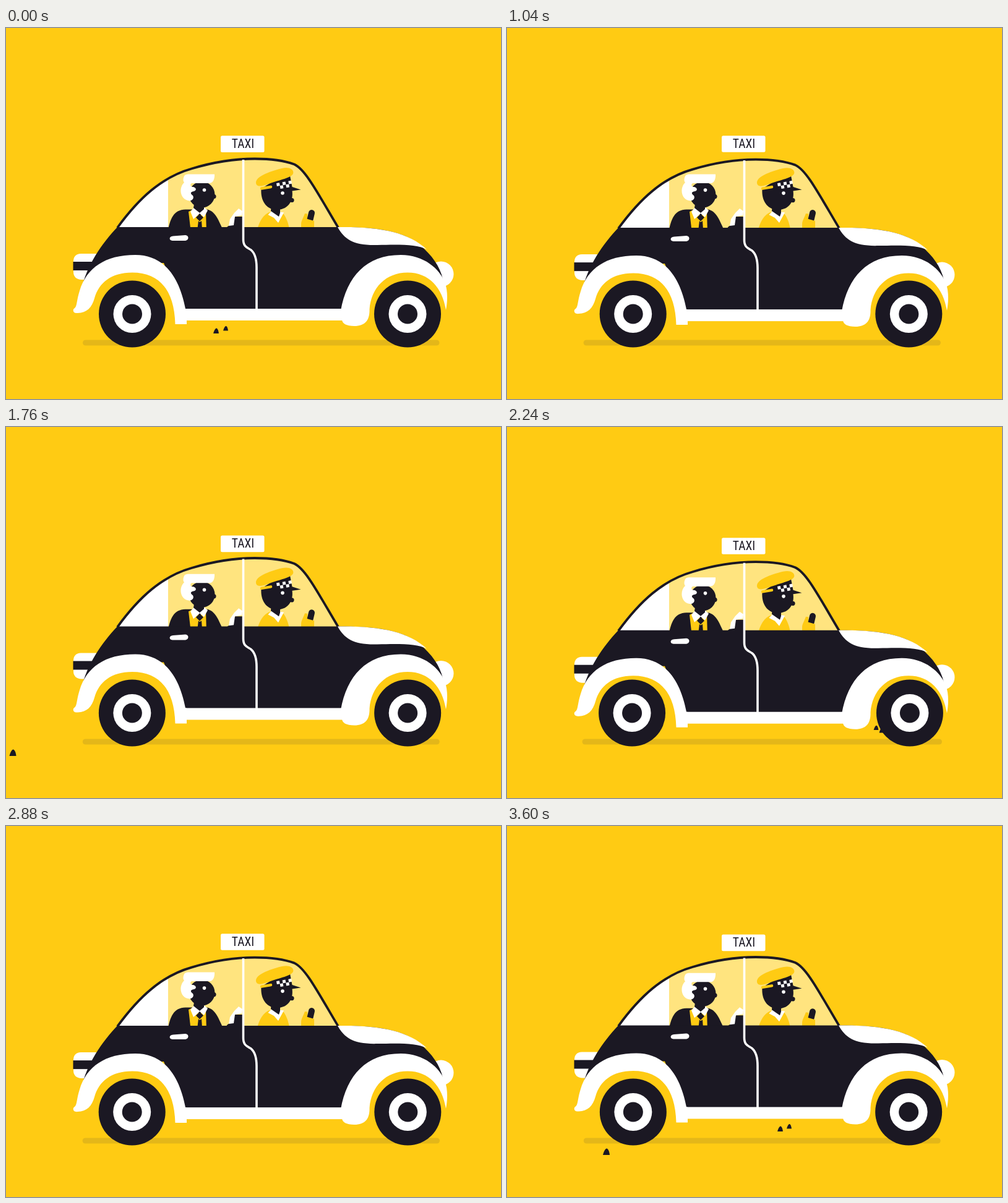
Animation of 800x600 px, one loop 3680 ms. Source, as an HTML page:

```html
<!DOCTYPE html>
<html lang="en">
<head>
<meta charset="utf-8">
<title>Taxi ride</title>
<style>
  html, body { margin: 0; width: 100%; height: 100%; overflow: hidden; background: #ffcb13; }
  svg { display: block; width: 800px; height: 600px; }
  .dark { fill: #1b1823; }
  .white { fill: #fff; }
  .yellow { fill: #ffcb13; }
  .sign { font: 400 19.5px "Roboto Condensed", Roboto, sans-serif; font-stretch: condensed; }
</style>
</head>
<body>
<svg viewBox="0 0 800 600">
  <defs>
    <path id="glass" d="M180 323C215 275 252 241 300 227.500C338 216 375 211.500 402 211.500C425 211.500 450 214.500 466 220.500C484 229 502 264 537 323"/>
    <clipPath id="rear"><rect x="170" y="200" width="92" height="130"/></clipPath>
    <path id="stone" d="M-5.5 5C-4 -1-1.5 -5.5 .8 -5.5C3.2 -5 5 0 5.5 5Z"/>
    <g id="wheel">
      <circle r="54" class="dark"/>
      <circle r="30.5" class="white"/>
      <circle r="16" class="dark"/>
    </g>
  </defs>

  <rect width="800" height="600" class="yellow"/>
  <line id="shadow" y1="509" y2="509" stroke="#e4b719" stroke-width="9" stroke-linecap="round"/>
  <g id="far" class="dark"></g>

  <g id="sign">
    <rect x="347" y="174.2" width="70.5" height="26.6" rx="2.5" class="white"/>
    <text x="383" y="194" text-anchor="middle" class="dark sign">TAXI</text>
  </g>

  <g id="panes">
    <use href="#glass" fill="#ffe47f"/>
    <use href="#glass" fill="#fff" clip-path="url(#rear)"/>
  </g>

  <g id="people">
    <!-- passenger -->
    <path class="dark" d="M261 332C265 308 271 294 290 293.500H325C338 296 343 309 353 332Z"/>
    <path class="yellow" d="M295 297L301 294L313 303L323 296L324 332H299Z"/>
    <path class="white" d="M298 297L304 290L320 290L326 295L320 306L313 300L303 309Z"/>
    <path class="dark" d="M313 300.500L319 306.500L313 312.500L307 306.500ZM311 312L313 314L316 312L317.500 332H308.500Z"/>
    <path class="dark" d="M305 278H320V293L313 299L303 291Z"/>
    <circle class="dark" cx="316.500" cy="269.500" r="21"/>
    <circle class="dark" cx="336" cy="272.500" r="3.600"/>
    <path class="white" d="M289 238C292 236 296 236.500 300 236.500H337C337.500 244 335 251 328 251H300C297 253 298 256 301 257C307 257 309 262 304 264C297 265 298 268 302 271C305 276 299 281 294 279C281 276 279 258 288 250C285 246 287 241 289 238Z"/>
    <circle class="white" cx="320.500" cy="262" r="2.800"/>
    <path class="dark" d="M354 332L357 322L361 319L366 305H382V332Z"/>
    <path class="white" d="M369 299L376 292L382 296L381 303L370 305L368 319L360 320L362 309Z"/>
    <!-- driver -->
    <path class="yellow" d="M405 332C408 311 419 298 430 297H445C452 303 457 315 459 332Z"/>
    <path class="white" d="M423.500 302L431 294L449 298.500L440 315L433 307Z"/>
    <path class="dark" d="M429 280H443V299L441 305L428 296Z"/>
    <path class="dark" d="M412.500 260L428 250L459 239L462.500 257L476.500 261.500L462.500 263.500C465 282 454 294 438 294C422 294 411 281 412.500 260Z"/>
    <circle class="dark" cx="462" cy="278.500" r="3.600"/>
    <circle class="white" cx="447" cy="267" r="2.800"/>
    <path class="yellow" d="M404 251C403 241 422 233 446 227C458 224 466 229 464 235.500C462 242 441 246 426 251.500C412 257 405 257 404 251Z"/>
    <path d="M413 259.500L428 257" stroke="#ffcb13" stroke-width="4.500" stroke-linecap="round"/>
    <g id="checks" class="white" transform="translate(437 251) rotate(-10)"></g>
    <path class="yellow" d="M477 332V317C477 312 481 306 483 300L487 300.500L487 309L498 313V332Z"/>
    <path d="M491.500 309.500L494 299" stroke="#1b1823" stroke-width="10" stroke-linecap="round"/>
    <path class="yellow" d="M484 332V308L498 312V332Z"/>
  </g>

  <g id="body">
    <use href="#glass" fill="none" stroke="#1b1823" stroke-width="3.800"/>
    <path class="white" d="M146 365H121C113 365 109 370 109 377V395C109 402 114 407 122 407H140Z"/>
    <rect class="dark" x="108.500" y="378" width="40" height="14"/>
    <circle class="white" cx="703" cy="398" r="20.500"/>
    <path class="dark" d="M180 322C155 348 130 385 122.500 421L160 380H255L285 456H545L640 390L706 406C701 385 689 368 668 350C640 328 600 322 537 322Z"/>
    <path class="white" d="M536 322C604 321 650 330 680 358C664 350 638 350 600 351C562 352 547 342 536 322Z"/>
    <path fill="none" stroke="#fff" stroke-width="3.600" d="M383.500 213V342C383.500 354 390 355 396 359C403 365 405 374 405 387V456"/>
    <path class="white" d="M270 336.500L290 335C296 335.500 296 343 290 344H269C263 343.500 263 337 270 336.500Z"/>
    <rect class="white" x="285" y="454" width="262" height="19"/>
    <!-- wheel wells -->
    <path class="yellow" d="M146 475C146 420 168 394 205 394C245 394 270 420 274 475Z"/>
    <path class="yellow" d="M584 475C586 420 612 394 650 394C688 394 708 425 711 455V475Z"/>
    <!-- fenders -->
    <path class="white" d="M116 461C108 462 107 455 111 453C115 450 114 440 119 425C130 388 160 367 209 367C255 367 280 402 290 454H292V479H273.500C272 424 248 395.500 204 395.500C170 395.500 150 412 143 437C139 452 130 461 116 461Z"/>
    <path class="white" d="M541 457C551 402 582 367 638 367C676 367 701 390 709 411C715 426 713 445 711 456C705 420 684 395.500 649 395.500C614 395.500 590 420 587.500 455C588 473 580 482 563 482C550 482 543 478 543 471Z"/>
  </g>

  <use id="back" href="#wheel"/>
  <use id="front" href="#wheel"/>
  <g id="near" class="dark"></g>
</svg>
<script>
const LOOP = 3680, STEP = 80, BOUNCE = 920;
const $ = id => document.getElementById(id);

function add(parent, tag, attrs) {
  const el = document.createElementNS("http://www.w3.org/2000/svg", tag);
  for (const k in attrs) el.setAttribute(k, attrs[k]);
  return $(parent).appendChild(el);
}

for (let i = 0; i < 10; i++) {
  const col = i % 5, row = Math.floor(i / 5);
  if ((col + row) % 2 === 0) add("checks", "rect", { x: col * 4.9, y: row * 5, width: 4.9, height: 5 });
}

// layer, time, x and y at that time, distance per step, scale
const stones = [
  ["far", 0, 339.5, 490, 102, .8],
  ["far", 0, 355, 486, 101, .72],
  ["far", 2240, 596.5, 486.5, 94.7, .7],
  ["far", 2240, 606, 490.5, 95, .8],
  ["near", 1600, 58, 531, 200, 1],
  ["near", 1760, 11, 527, 180, 1],
  ["near", 3520, 58, 531, 200, 1],
  ["near", 3600, 160.5, 527, 199, 1]
].map(([layer, time, x, y, speed, scale]) =>
  ({ time, x, y, speed, scale, el: add(layer, "use", { href: "#stone" }) }));

const swing = (t, lag) => 1 - Math.cos((t - lag) / BOUNCE * 2 * Math.PI);
const move = (id, x, y) => $(id).setAttribute("transform", `translate(${x} ${y})`);

function draw(t) {
  const sink = swing(t, 0);
  for (const id of ["body", "panes"]) move(id, 0, sink * 3.5);
  move("people", 0, swing(t, 55) * 4.2 - .3);
  move("sign", 0, swing(t, 70) * 3.2 - .2);
  move("back", 204 - sink, 462.5);
  move("front", 649 + sink, 462.5);
  $("shadow").setAttribute("x1", 128.5 - sink * 1.3);
  $("shadow").setAttribute("x2", 696 + sink * 1.3);

  for (const s of stones) {
    const half = LOOP / 2;
    const dt = (t - s.time + LOOP + half) % LOOP - half;
    const x = s.x - s.speed * dt / STEP;
    s.el.setAttribute("transform", `translate(${x} ${s.y}) scale(${s.scale})`);
  }
}

const start = performance.now();
function tick() {
  const t = (performance.now() - start) % LOOP;
  draw(Math.floor(t / STEP) * STEP);
  requestAnimationFrame(tick);
}
tick();
</script>
</body>
</html>
```
